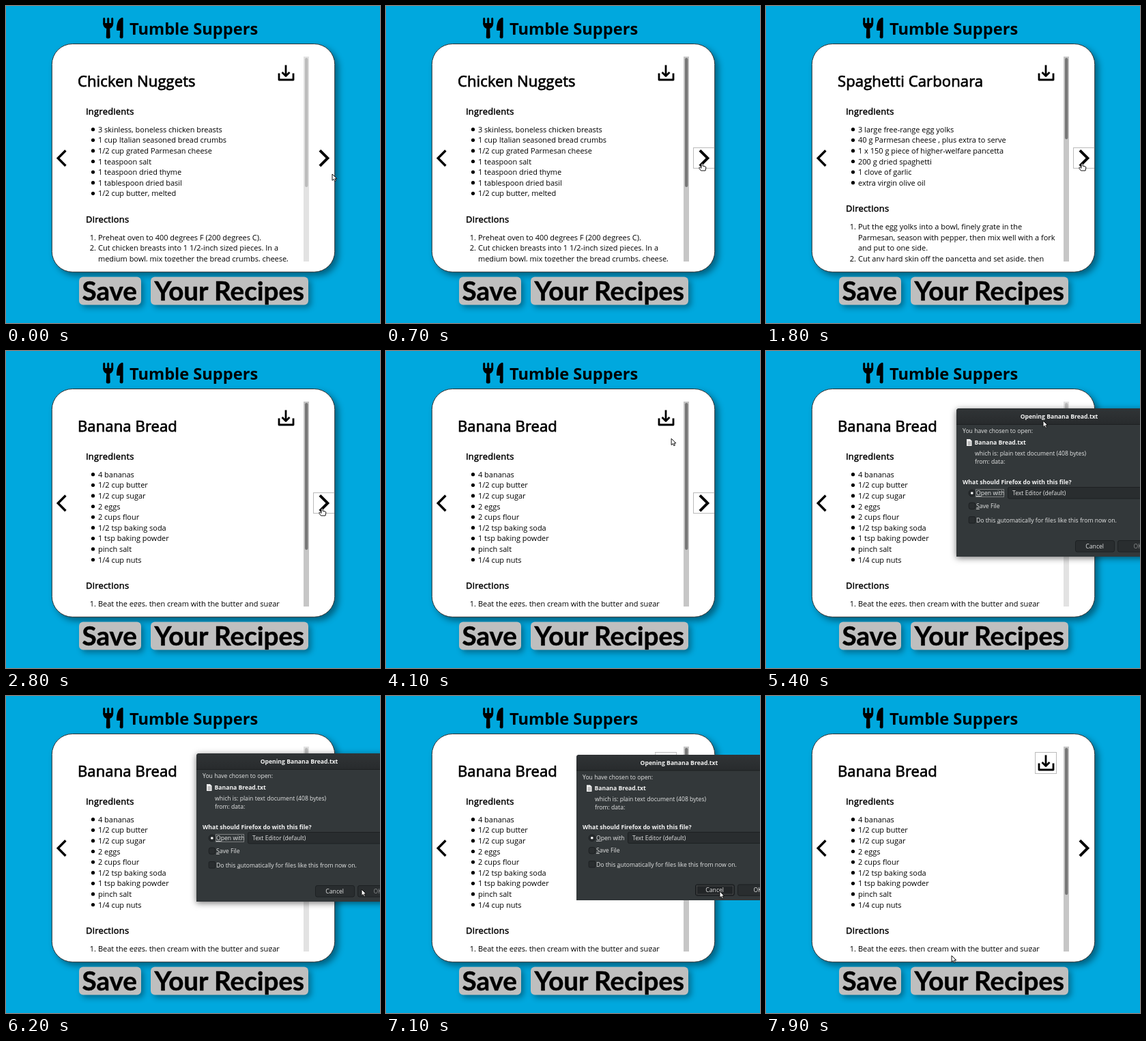
An HTML page for the animation above (8 s loop, 548 px wide and 464 px high).

```html
<!DOCTYPE html>
<html lang="en">
<head>
<meta charset="utf-8">
<title>Recipes</title>
<style>
  html, body { margin: 0; width: 100%; height: 100%; overflow: hidden; background: #00a8de; }
  svg { display: block; width: 548px; height: 464px; }
  text { font-family: "Open Sans", "Noto Sans", sans-serif; font-size: 10.97px; white-space: pre; }
  .brand { font-size: 23.6px; font-weight: 700; }
  .card { fill: #fff; stroke: #333; filter: drop-shadow(5px 5px 5px rgba(0,0,0,.42)); }
  .name, .head { stroke: #000; stroke-linejoin: round; }
  .name { font-size: 22px; letter-spacing: .12px; stroke-width: .75px; }
  .head { font-size: 12.87px; letter-spacing: .28px; stroke-width: .5px; }
  .line { fill: none; stroke: #000; }
  .ring { fill: none; stroke: #777; stroke-dasharray: 1 1; }
  .tag rect { fill: #bfbfbf; filter: drop-shadow(4px 4px 4px rgba(0,0,0,.36)); }
  .tag text { font: 700 38.6px Lato, "Open Sans", sans-serif; stroke: #000; stroke-width: .5px; }
  #dialog text { font-size: 8.63px; fill: #e4e5e5; }
  #dialog .b { font-weight: 700; fill: #f3f3f3; }
  #dialog .mid { text-anchor: middle; }
  #dialog .u { text-decoration: underline; }
  .shadow { filter: drop-shadow(0 2px 5px rgba(0,0,0,.55)); }
  .well { fill: #292d2f; stroke: #1d2022; }
</style>
</head>
<body>
<svg viewBox="0 0 548 464">
  <defs>
    <clipPath id="view"><rect x="90" y="74" width="346" height="300"/></clipPath>
    <linearGradient id="bar" x2="0" y2="1"><stop stop-color="#303436"/><stop offset="1" stop-color="#282b2d"/></linearGradient>
  </defs>
  <rect width="548" height="464" fill="#00a8de"/>

  <!-- fork and knife -->
  <g>
    <path class="line" stroke-width="3" stroke-linecap="round" d="M143.7 18.5V26M149.7 18.5V27M155.7 18.5V26"/>
    <path d="M142.2 25H157.2Q157.2 31.5 152.2 33L152.7 45.5Q152.6 47.6 149.7 47.6T146.7 45.5L147.2 33Q142.2 31.5 142.2 25Z"/>
    <path d="M171.6 18.3V45.5Q171.6 47.6 169.2 47.6T166.6 45.5L167.2 36H163Q161.8 36 162 34.4Q162.2 19.5 170 17Q171.6 16.7 171.6 18.3Z"/>
  </g>
  <text class="brand" x="181" y="42">Tumble Suppers</text>

  <rect class="card" x="67.3" y="55.5" width="414.4" height="333.8" rx="30"/>
  <g clip-path="url(#view)" id="page"></g>
  <rect id="track" x="436" y="74" width="8" height="300"/>
  <rect id="thumb" x="438" y="76" width="4.4" rx="2.2"/>

  <path class="line" stroke-width="3.4" d="M87.4 211.5L76.2 222.7 87.4 234"/>
  <path class="line" stroke-width="4" d="M459.9 211.3L471.3 222.7 459.9 234.1"/>
  <path class="line" stroke-width="2.8" stroke-linejoin="round" d="M410 86.5V102M404.5 97L410 102.5 415.5 97M400 98.5V108H421V98.5"/>
  <path class="ring" id="nextRing" d="M481.5 207.5H450.5V237.5H481.5"/>
  <rect class="ring" id="saveRing" x="394.5" y="82.5" width="31" height="31"/>

  <g class="tag">
    <rect x="107" y="396.5" width="91" height="41" rx="6"/>
    <text x="111.5" y="430.5">Save</text>
    <rect x="212" y="396.5" width="231" height="41" rx="6"/>
    <text x="217.5" y="430.5">Your Recipes</text>
  </g>

  <g id="dialog">
    <g id="frame">
      <path fill="#33383a" d="M279 301V88Q279 84 283 84H576Q580 84 580 88V301Z"/>
      <path fill="url(#bar)" d="M279 107.5V88Q279 84 283 84H576Q580 84 580 88V107.5Z"/>
      <path stroke="#1d2021" d="M279 107.5H580"/>
    </g>
    <text class="b mid" x="429.5" y="99.2">Opening Banana Bread.txt</text>
    <text x="288" y="120.3">You have chosen to open:</text>
    <path fill="#f0f0f0" d="M294 129H299L301.5 131.5V139H294Z"/>
    <path stroke="#777" stroke-width=".8" d="M295.5 133H300M295.5 135H300M295.5 137H300"/>
    <text class="b" x="305.5" y="137.2">Banana Bread.txt</text>
    <text x="306" y="153">which is: plain text document (408 bytes)</text>
    <text x="306" y="165.2">from: data:</text>
    <text class="b" x="288" y="194.6">What should Firefox do with this file?</text>
    <rect class="well" x="354.5" y="199.5" width="220" height="16.5" rx="2"/>
    <circle class="well" cx="301.8" cy="208" r="4.8"/>
    <circle cx="301.8" cy="208" r="1.8" fill="#fff"/>
    <text x="308" y="211.2"><tspan class="u">O</tspan>pen with</text>
    <rect class="ring" id="openRing" x="307.5" y="202.5" width="41" height="11" style="stroke:#c8c8c8"/>
    <text x="361" y="211.2">Text Editor (default)</text>
    <rect class="well" x="297.2" y="222" width="9.5" height="9.5" rx="3"/>
    <text x="308" y="229.8"><tspan class="u">S</tspan>ave File</text>
    <rect class="well" x="297.2" y="242.5" width="9.5" height="9.5" rx="1.5"/>
    <text x="308" y="250.6">Do this <tspan class="u">a</tspan>utomatically for files like this from now on.</text>
    <rect class="well" id="cancel" x="453.5" y="277.5" width="57" height="16.5" rx="2.5"/>
    <rect class="ring" id="cancelRing" x="455.5" y="279.5" width="53" height="12.5" style="stroke:#666"/>
    <text class="mid" x="481.7" y="288.9">Cancel</text>
    <rect class="well" x="515.5" y="277.5" width="58" height="16.5" rx="2.5"/>
    <text class="mid" id="ok" x="544.5" y="288.9">OK</text>
  </g>

  <g id="cursor" stroke="#111" stroke-width="1" stroke-linejoin="round" fill="#fff">
    <path id="arrow" d="M0 0V9.4L2.2 7.4 3.8 10.6 5.4 9.8 3.8 6.8H6.8Z"/>
    <path id="hand" d="M-1 6V1Q0 -.6 1.2 1V4.2L5 5Q6 5.4 5.8 7L5 11H-1.6L-4.2 7.4Q-4.4 5.6 -2.6 6.2L-1 7.4Z"/>
  </g>
</svg>
<script>
const LOOP = 8000, STEP = 100, PITCH = 15.6;
const $ = id => document.getElementById(id);
const show = (id, on) => $(id).setAttribute("visibility", on ? "inherit" : "hidden");
const set = (id, name, value) => $(id).setAttribute(name, value);

// steps: each entry is a numbered item made of wrapped lines
const recipes = [
  { from: 0, end: 265, name: "Chicken Nuggets",
    items: ["3 skinless, boneless chicken breasts", "1 cup Italian seasoned bread crumbs",
      "1/2 cup grated Parmesan cheese", "1 teaspoon salt", "1 teaspoon dried thyme",
      "1 tablespoon dried basil", "1/2 cup butter, melted"],
    steps: [["Preheat oven to 400 degrees F (200 degrees C)."],
      ["Cut chicken breasts into 1 1/2-inch sized pieces. In a",
        "medium bowl, mix together the bread crumbs, cheese,"]] },
  { from: 1600, end: 195, name: "Spaghetti Carbonara",
    items: ["3 large free-range egg yolks", "40 g Parmesan cheese , plus extra to serve",
      "1 x 150 g piece of higher-welfare pancetta", "200 g dried spaghetti",
      "1 clove of garlic", "extra virgin olive oil"],
    steps: [["Put the egg yolks into a bowl, finely grate in the",
      "Parmesan, season with pepper, then mix well with a fork", "and put to one side."],
      ["Cut any hard skin off the pancetta and set aside, then"]] },
  { from: 2800, end: 291, name: "Banana Bread",
    items: ["4 bananas", "1/2 cup butter", "1/2 cup sugar", "2 eggs", "2 cups flour",
      "1/2 tsp baking soda", "1 tsp baking powder", "pinch salt", "1/4 cup nuts"],
    steps: [["Beat the eggs, then cream with the butter and sugar"]] }
];

const label = (x, y, str, cls = "") => `<text class="${cls}" x="${x}" y="${y}">${str}</text>`;

function pageMarkup({ name, items, steps }) {
  let y = 184.7;
  let out = label(105, 118, name, "name") + label(117, 159, "Ingredients", "head");
  for (const item of items) {
    out += `<circle cx="127.5" cy="${y - 4}" r="2.6"/>` + label(135, y, item);
    y += PITCH;
  }
  y += 23.1;
  out += label(117, y, "Directions", "head");
  y += 25.6;
  steps.forEach((lines, n) => {
    out += label(122.8, y, `${n + 1}.`);
    for (const line of lines) {
      out += label(135, y, line);
      y += PITCH;
    }
  });
  return out;
}

// time, x, y of the pointer tip
const path = [
  [0, 478, 246], [100, 478, 245], [500, 463, 230], [3600, 463, 230], [4300, 407, 103],
  [5300, 406, 102], [5500, 406, 102], [6200, 521, 283], [6400, 529, 291],
  [6700, 489, 286], [7400, 489, 286], [7900, 272, 380], [LOOP, 272, 380]
];

function pointer(t) {
  const i = path.findIndex(p => p[0] > t);
  const [t0, x0, y0] = path[i - 1], [t1, x1, y1] = path[i];
  const p = (t - t0) / (t1 - t0), e = p * p * (3 - 2 * p);
  return [x0 + (x1 - x0) * e, y0 + (y1 - y0) * e];
}

let current, last;

function draw(t) {
  const recipe = recipes.filter(r => r.from <= t).pop();
  if (recipe !== current) {
    current = recipe;
    $("page").innerHTML = pageMarkup(recipe);
    set("thumb", "height", recipe.end - 76);
  }

  const within = (a, b) => t >= a && t < b;
  const active = within(500, 5300) || t >= 7100;
  set("track", "fill", active ? "#c6c6c6" : "#e2e2e2");
  set("thumb", "fill", active ? "#777" : "#bcbcbc");
  show("nextRing", within(500, 4900));
  show("saveRing", active && t >= 4900);

  const squash = t < 7100 ? 1 : t < 7200 ? .982 : .45;
  show("dialog", within(5400, 7300));
  set("dialog", "transform", `translate(0 ${192.5 * (1 - squash)}) scale(1 ${squash})`);
  set("frame", "class", t < 7100 ? "shadow" : "");
  show("openRing", within(5400, 7000));
  show("cancelRing", within(7000, 7300));
  $("cancel").style.fill = t >= 7000 ? "#222527" : t >= 6700 ? "#373c3f" : "";
  $("ok").style.fill = t >= 6400 ? "" : "#8b8e8f";

  const [x, y] = pointer(t);
  const hand = within(500, 3700) || within(4200, 5300);
  set("cursor", "transform", `translate(${x} ${y})`);
  show("hand", hand);
  show("arrow", !hand);
}

const start = performance.now();
function tick() {
  const t = Math.floor((performance.now() - start) % LOOP / STEP) * STEP;
  if (t !== last) draw(last = t);
  requestAnimationFrame(tick);
}
tick();
</script>
</body>
</html>
```
